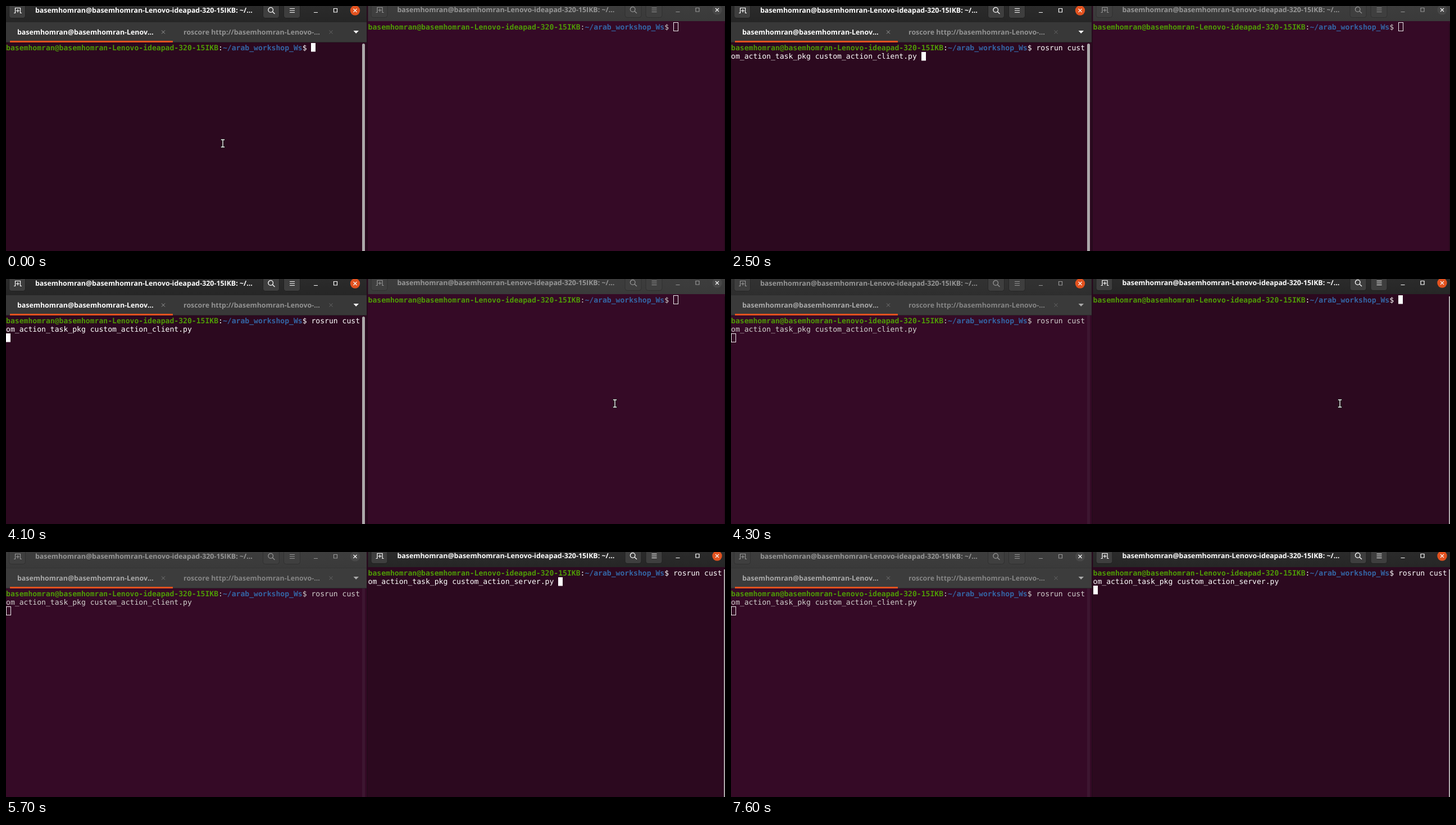
An HTML page with a canvas that plays this animation: 1280 by 437 pixels, repeating every 8 s.

```html
<!DOCTYPE html>
<html lang="en">
<head>
<meta charset="utf-8">
<title>Two terminals</title>
<style>
html, body { margin: 0; width: 1280px; height: 437px; overflow: hidden; background: #2c091f; }
canvas { display: block; }
</style>
</head>
<body>
<canvas id="stage" width="1280" height="437"></canvas>
<script>
const ctx = document.getElementById('stage').getContext('2d');
ctx.textRendering = 'geometricPrecision';

const LOOP = 8000, STEP = 100;
const CELL = 7.875, ROW = 15.7, COLS = 80;
const ORANGE = '#e2521f', UI_FONT = '700 12.4px "Open Sans", "Noto Sans", sans-serif';
const USER = 'basemhomran';
const HOST = USER + '@' + USER + '-Lenovo-ideapad-320-15IKB';
const PATH = '~/arab_workshop_Ws';
const PROMPT = HOST + ':' + PATH + '$ ';
const command = role => `rosrun custom_action_task_pkg custom_action_${role}.py `;

const clamp = v => Math.max(0, Math.min(1, v));
const mix = (a, b, k) => `rgb(${a.map((v, i) => Math.round(v + (b[i] - v) * k))})`;
const gray = (a, b, k) => mix([a, a, a], [b, b, b], k);
const within = (t, ...spans) => spans.some(([a, b]) => t >= a && t < b);

function rect(x, y, w, h, color) {
  ctx.fillStyle = color;
  ctx.fillRect(x, y, w, h);
}

function line(d, color, width = 1) {
  ctx.strokeStyle = color;
  ctx.lineWidth = width;
  ctx.stroke(new Path2D(d));
}

function label(text, x, y, color) {
  ctx.font = UI_FONT;
  ctx.fillStyle = color;
  ctx.fillText(text, x, y);
}

function button(x, fill, edge) {
  ctx.beginPath();
  ctx.roundRect(x + .5, -8.5, 29, 30, 4);
  ctx.fillStyle = fill;
  ctx.fill();
  ctx.strokeStyle = edge;
  ctx.lineWidth = 1;
  ctx.stroke();
}

// fade: 0 focused .. 1 unfocused; closeFade: the same for the close button
function header(x, y, height, fade, closeFade, ink) {
  const bar = ctx.createLinearGradient(0, 0, 0, height);
  bar.addColorStop(0, gray(43, 61, fade));
  bar.addColorStop(1, gray(38, 58, fade));
  rect(x, 0, x ? 638 : 642, height, bar);
  ctx.save();
  ctx.translate(x, y);
  for (const bx of [5, 457, 494]) button(bx, gray(62, 63, fade), gray(32, 48, fade));
  line('M14 12.5H16.5V3.5H25.5V12.5H28M21 5.5V11.5M18 8.5H24', ink, 1.2);
  line('M475.5 7a4.3 4.3 0 1 1-8.6 0a4.3 4.3 0 1 1 8.6 0M474.5 10.3L478.5 14', ink, 1.3);
  line('M505 4.5H514M505 8H514M505 11.5H514', ink, 1.2);
  line('M548 11.5H555M583.5 4.5H589.5V11H583.5Z', ink, 1.2);
  label(HOST + ': ~/…', 52, 12.3, ink);
  ctx.beginPath();
  ctx.arc(621.5, 8, 8.7, 0, 7);
  ctx.fillStyle = mix([226, 82, 31], [72, 72, 72], closeFade);
  ctx.fill();
  line('M618.5 5L624.5 11M624.5 5L618.5 11', '#f4f4f4', 1.3);
  ctx.restore();
}

function tabs(fade, focused) {
  rect(0, 28, 642, 37, gray(56, 60, fade));
  rect(0, 28, 642, 1, gray(39, 52, fade));
  rect(0, 64, 642, 1, '#292929');
  rect(7, 62, 290, 3, ORANGE);
  const dim = focused ? '#929292' : '#858585';
  label(USER + '@' + USER + '-Lenov…', 20, 50.7, focused ? '#fff' : '#aaa');
  label('roscore http://' + USER + '-Lenovo-…', 316, 50.7, dim);
  line('M277 43.5L283 49.5M283 43.5L277 49.5', focused ? '#999' : '#777');
  line('M575.5 43.5L581.5 49.5M581.5 43.5L575.5 49.5', '#686868');
  ctx.fillStyle = focused ? '#fff' : '#aaa';
  ctx.fill(new Path2D('M618.5 44H628L623.2 49Z'));
}

// Text is laid out on the terminal grid and wraps at COLS.
function terminal(x, y, typed, caret, focused) {
  const ink = focused ? '#fff' : '#d0cfcc';
  const pathEnd = HOST.length + 1 + PATH.length;
  const text = PROMPT + typed;
  let col = 0, row = 0;
  for (let i = 0; i < text.length; i++) {
    if (text[i] === '\n') { col = 0; row++; continue; }
    const host = i < HOST.length, path = i > HOST.length && i < pathEnd;
    ctx.font = (host || path ? '700' : '400') + ' 13.08px "DejaVu Sans Mono", monospace';
    ctx.fillStyle = host ? '#4e9a06' : path ? '#3465a4' : ink;
    ctx.fillText(text[i], x + col * CELL, y + row * ROW + 12.5);
    if (++col === COLS) { col = 0; row++; }
  }
  if (!caret) return;
  const cx = Math.round(x + col * CELL), cy = Math.round(y + row * ROW);
  if (focused) rect(cx, cy, 8, 15.5, '#fff');
  else {
    ctx.strokeStyle = '#eee';
    ctx.lineWidth = 1;
    ctx.strokeRect(cx + .5, cy + .5, 8, 15);
  }
}

function pointer(t) {
  if (within(t, [400, 3600], [5300, LOOP])) return;
  const stops = [[386, 245], [470, 270], [740, 288], [1000, 256], [1084, 222]];
  const [x, y] = stops[Math.max(0, Math.min(4, (t - 3700) / STEP))];
  ctx.save();
  ctx.translate(x, y);
  const beam = 'M-2.5 -6.5H2.5M0 -6.5V6.5M-2.5 6.5H2.5';
  ctx.lineCap = 'square';
  line(beam, '#111', 3);
  line(beam, '#fff', 1.3);
  ctx.restore();
}

function draw(now) {
  const t = Math.floor(now % LOOP / STEP) * STEP;
  const leftFocus = t < 4300, rightFocus = !leftFocus;
  const closeFade = clamp((t - 4300) / 400);
  const leftFade = leftFocus ? 0 : clamp(closeFade + .4);
  const ink = focused => focused ? '#fff' : '#959595';
  const ground = focused => focused ? '#2c091f' : '#350a26';

  rect(0, 0, 642, 437, ground(leftFocus));
  rect(642, 0, 638, 437, ground(rightFocus));

  header(0, 0, 28, leftFade, closeFade, ink(leftFocus));
  tabs(leftFade, leftFocus);
  const leftTyped = t < 900 ? '' : command('client') + (t < 2600 ? '' : '\n');
  terminal(0, 66, leftTyped, !within(t, [1400, 2500], [3200, 3800]), leftFocus);
  if (leftFocus) {
    ctx.beginPath();
    ctx.roundRect(634, 67, 5, 380, 2.5);
    ctx.fillStyle = '#aca8aa';
    ctx.fill();
  } else rect(634, 65, 5, 372, '#3d1630');

  header(644.5, -1, 27, rightFocus ? 0 : 1, rightFocus ? 0 : 1, ink(rightFocus));
  rect(642, 0, 2, 437, '#260a1c');
  const rightTyped = t < 5500 ? '' : t < 5700 ? 'clear' : command('server') + (t < 7600 ? '' : '\n');
  terminal(644.5, 29, rightTyped, !within(t, [4800, 5300], [6300, 6900], [7500, 7600]), rightFocus);
  rect(1278, 31, 2, 406, rightFocus ? '#aca8aa' : '#2b0a1f');

  pointer(t);
}

function tick() {
  draw(performance.now());
  requestAnimationFrame(tick);
}
tick();
</script>
</body>
</html>
```
